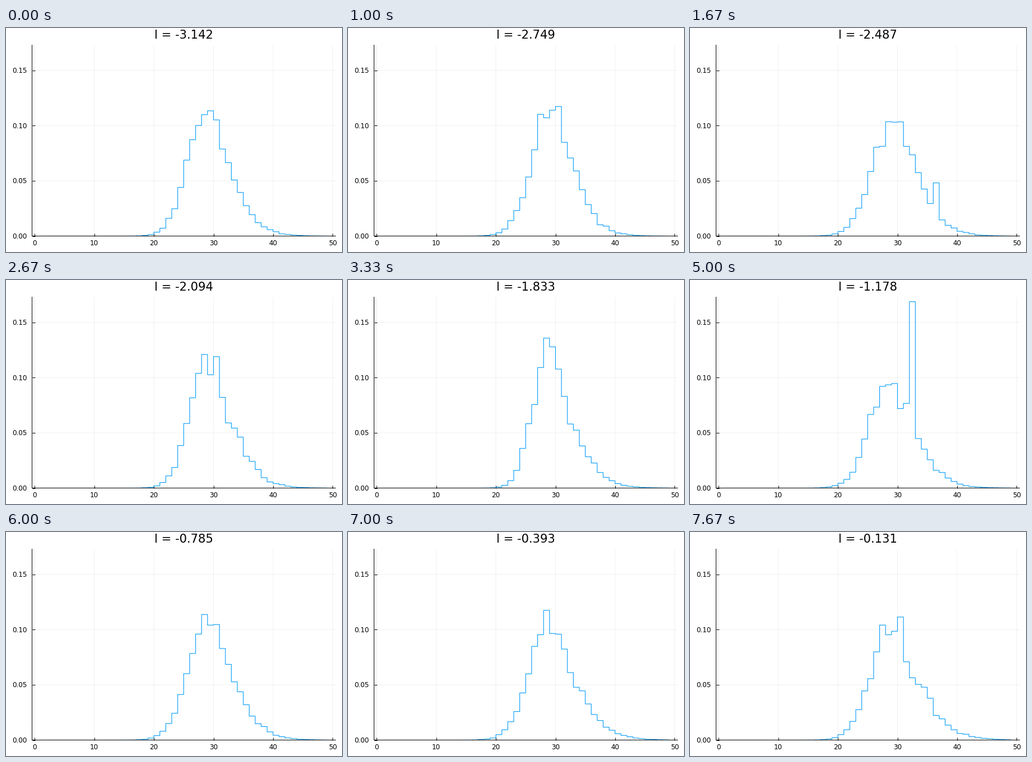
Animation of 600x400 px, one loop 8000 ms. Source, as a matplotlib script:

```python
import numpy as np
import matplotlib.pyplot as plt
from matplotlib.animation import FuncAnimation

WIDTH, HEIGHT, DPI = 600, 400, 100
STEPS, FRAMES, INTERVAL = 24, 200, 40
PX = 72 / DPI
LEFT, RIGHT, TOP, BOTTOM = 46.5, 588.5, 30.5, 371.5
X0, X_UNIT, Y_UNIT = 51.3, 10.64, 1972
BINS = np.arange(1, 49)

# Key poses of the bell: step, peak bin, left width, right width.
POSES = np.array([
    (0, 28.6, 3.2, 4.9),
    (3, 29.2, 3.4, 4.6),
    (5, 29.2, 3.6, 5.0),
    (10, 28.2, 2.6, 5.2),
    (15, 28.5, 3.4, 5.2),
    (18, 28.8, 3.4, 5.2),
    (23, 28.4, 3.4, 6.0),
])
# Single heavy samples: step -> (bin, share of the total).
SPIKES = {5: (36, 0.026), 15: (32, 0.114)}
ROUGHNESS = 0.08


def densities(step):
    """Skewed bell with sampling noise, normalised to a total of one."""
    peak, left, right = (np.interp(step, POSES[:, 0], POSES[:, i]) for i in (1, 2, 3))
    offset = BINS - peak
    bell = np.where(offset < 0,
                    np.exp(-0.5 * (offset / left) ** 2),
                    np.exp(-np.abs(offset / right) ** 1.5))
    bell *= np.random.default_rng(step).lognormal(0, ROUGHNESS, BINS.size)
    spike_bin, share = SPIKES.get(step, (0, 0))
    return (1 - share) * bell / bell.sum() + share * (BINS == spike_bin)


def label(x, y, text, size, align):
    return fig.text(x / WIDTH, 1 - y / HEIGHT, text, fontsize=size * PX,
                    ha=align, va="baseline")


plt.rcParams["font.family"] = "DejaVu Sans"
plt.rcParams["path.snap"] = False
fig = plt.figure(figsize=(WIDTH / DPI, HEIGHT / DPI), dpi=DPI, facecolor="white")
ax = fig.add_axes([LEFT / WIDTH, 1 - BOTTOM / HEIGHT,
                   (RIGHT - LEFT) / WIDTH, (BOTTOM - TOP) / HEIGHT])
ax.set_xlim((LEFT - X0) / X_UNIT, (RIGHT - X0) / X_UNIT)
ax.set_ylim(0, (BOTTOM - TOP) / Y_UNIT)
x_ticks, y_ticks = range(0, 51, 10), (0, 0.05, 0.1, 0.15)
ax.set_xticks(x_ticks)
ax.set_yticks(y_ticks)
ax.tick_params(direction="in", length=5 * PX, width=PX,
               labelbottom=False, labelleft=False)
ax.set_axisbelow(True)
ax.grid(color="black", alpha=0.06, linewidth=PX)
ax.spines[["top", "right"]].set_visible(False)
ax.spines[["left", "bottom"]].set_linewidth(PX)

for x in x_ticks:
    label(X0 + x * X_UNIT, 387.5, str(x), 12, "center")
for y in y_ticks:
    label(37.9, BOTTOM - y * Y_UNIT + 4.5, f"{y:.2f}", 12, "right")

title = label(317.2, 18.8, "", 21.1, "center")
outline = ax.stairs(densities(0), np.append(BINS, BINS[-1] + 1),
                    color="#009AFA", linewidth=1.1 * PX)


def update(frame):
    # Steps last a third of a second; the offset rounds each change to its tick.
    step = (3 * frame + 2) // 25
    title.set_text(f"l = {-np.pi + step * np.pi / STEPS:.3f}")
    outline.set_data(densities(step))
    return title, outline


animation = FuncAnimation(fig, update, frames=FRAMES, interval=INTERVAL,
                          repeat=True, repeat_delay=0)
plt.show()
```
